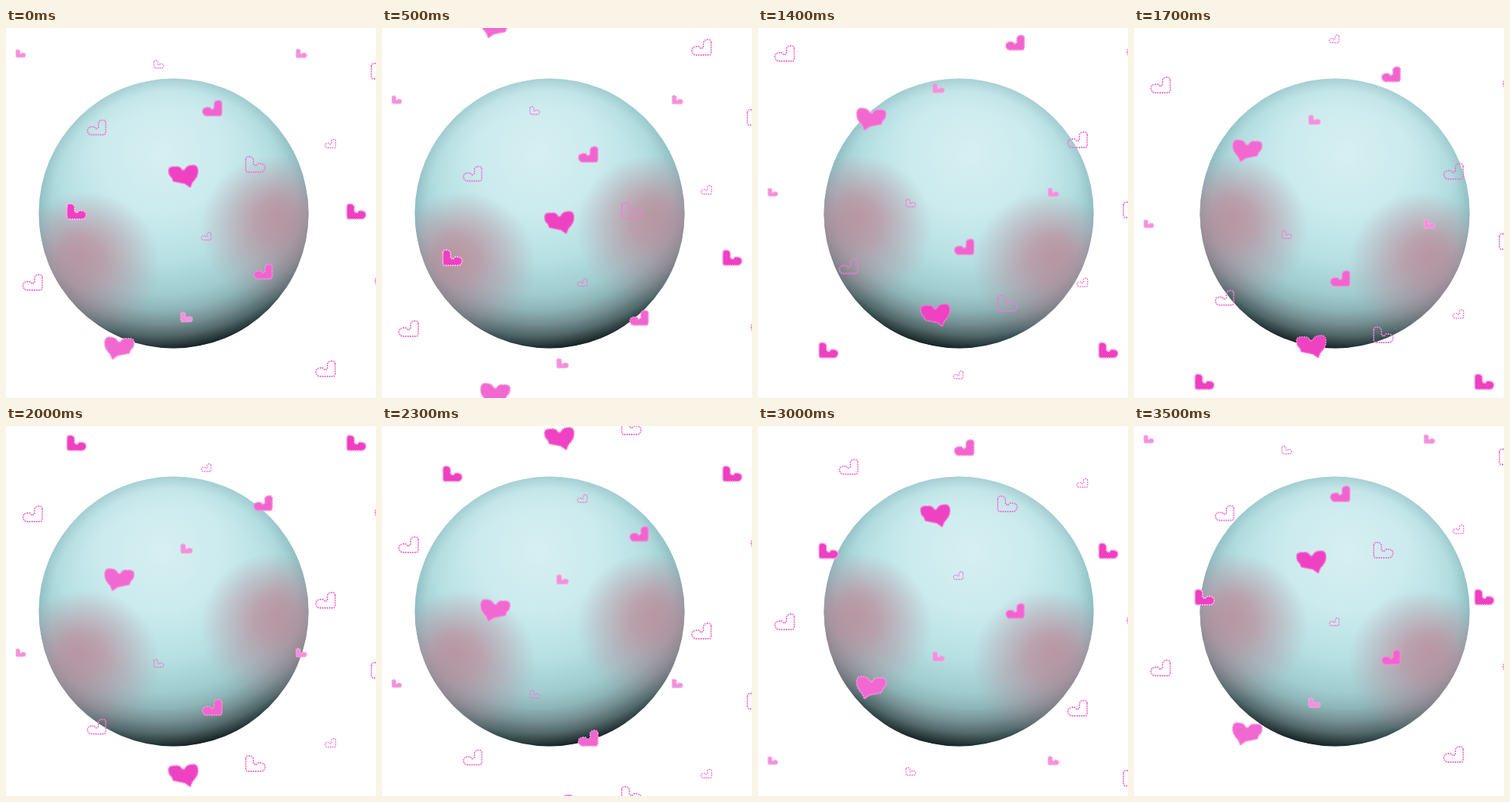
Recreate the animation shown at these times as an HTML page with a canvas. Size 480 px wide and 480 px high, loop 3.6 s.

```html
<!DOCTYPE html>
<html lang="en">
<head>
<meta charset="utf-8">
<title>Rocking ball and falling hearts</title>
<style>
html, body { margin: 0; width: 100%; height: 100%; overflow: hidden; background: #fff; }
canvas { display: block; width: 480px; height: 480px; }
</style>
</head>
<body>
<canvas id="stage" width="480" height="480"></canvas>
<script>
const ctx = document.getElementById("stage").getContext("2d");
const LOOP = 3600, STEP = 20.05, TILE = 477, RADIUS = 175;

// Heart outlines, drawn around their centres
const tilted = new Path2D("M-12-6Q-12-10-8-10Q-3-10-2-6V0L1 2L4-1H8Q13 0 13 4Q13 8 9 10H-10Q-12 9-12 6Z");
const large = new Path2D("M-1-7Q-4-13-10-12Q-20-13-19-6Q-19-1-15 2L-13 7L2 10L9 15L12 8Q19 1 19-6Q19-14 13-14Q4-14 2-8Z");

const styles = {
  line: { path: tilted, stroke: "#f07cd4" },
  hot: { path: tilted, fill: "#ee40c0", stroke: "#fab4ea" },
  pink: { path: tilted, fill: "#f164ce", stroke: "#f58fdd" },
  pale: { path: tilted, fill: "#f490da", stroke: "#f8a8e4" },
  bigHot: { path: large, fill: "#ee42c2", stroke: "#f27ad6" },
  bigPink: { path: large, fill: "#f169d0", stroke: "#f595de" }
};

// x, y, style, scale, direction (-1 mirrors)
const hearts = [
  [19, 33, "pale", .5, 1], [383, 33, "pale", .55, 1],
  [198, 47, "line", .5, 1], [486, 56, "line", 1, 1],
  [268, 104, "pink", 1, -1], [118, 129, "line", .95, -1],
  [421, 150, "line", .55, -1], [323, 177, "line", 1, 1],
  [230, 192, "bigHot", 1, 1], [91, 238, "hot", 1, 1],
  [454, 238, "hot", 1, 1], [260, 270, "line", .5, -1],
  [334, 316, "pink", .95, -1], [35, 330, "line", 1, -1],
  [492, 324, "line", 1, -1], [234, 375, "pale", .6, 1],
  [147, 415, "bigPink", 1, -1], [415, 442, "line", 1, -1]
];

function radial(focus, center, inner, outer, stops) {
  const g = ctx.createRadialGradient(...focus, inner, ...center, outer);
  for (const [at, color] of stops) g.addColorStop(at, color);
  return g;
}

function paintBall(fill) {
  ctx.fillStyle = fill;
  ctx.fillRect(-RADIUS, -RADIUS, 2 * RADIUS, 2 * RADIUS);
}

const skin = radial([0, -80], [0, -80], 0, 255, [
  [0, "#d6eff2"], [.31, "#cbebee"], [.55, "#b6e0e3"], [.72, "#a0cccf"],
  [.8, "#8db5b8"], [.87, "#758f92"], [.93, "#516466"], [.97, "#273031"], [1, "#000"]
]);
const rim = radial([0, 0], [0, 0], 135, RADIUS, [
  [0, "rgba(90,150,158,0)"], [.6, "rgba(90,150,158,.06)"], [1, "rgba(80,135,143,.25)"]
]);
const blushes = [-1, 1].map(side => radial([side * 130, 28], [side * 124, 45], 0, 96, [
  [0, "rgba(190,130,146,.75)"], [.3, "rgba(190,130,146,.64)"],
  [.65, "rgba(188,134,150,.34)"], [1, "rgba(185,140,155,0)"]
]));

function drawBall(leansLeft) {
  ctx.save();
  ctx.translate(leansLeft ? 217.5 : 260.5, 240.5);
  ctx.rotate((leansLeft ? -11 : 11) * Math.PI / 180);
  ctx.beginPath();
  ctx.arc(0, 0, RADIUS, 0, 2 * Math.PI);
  ctx.clip();
  [skin, rim, ...blushes].forEach(paintBall);
  ctx.restore();
}

function drawHeart(x, y, { path, fill, stroke }, scale, dir) {
  ctx.save();
  ctx.translate(x, y);
  ctx.scale(scale * dir, scale);
  if (fill) {
    ctx.fillStyle = fill;
    ctx.fill(path);
  }
  ctx.strokeStyle = stroke;
  ctx.lineWidth = 1.8 / Math.sqrt(scale);
  ctx.setLineDash([2 / scale, 1 / scale]);
  ctx.stroke(path);
  ctx.restore();
}

function draw(now) {
  const t = now % LOOP;
  // Steps alternate between 200 and 100 ms
  const step = 2 * Math.floor(t / 300) + (t % 300 >= 200 ? 1 : 0);
  const drop = Math.round(step * STEP);

  ctx.fillStyle = "#fff";
  ctx.fillRect(0, 0, 480, 480);
  drawBall(t % 1800 < 900);
  for (const [x, y, style, scale, dir] of hearts) {
    const top = (y + drop) % TILE;
    for (const copy of [top - TILE, top, top + TILE])
      if (copy > -20 && copy < 500) drawHeart(x, copy, styles[style], scale, dir);
  }
}

const start = performance.now();
function tick() {
  draw(performance.now() - start);
  requestAnimationFrame(tick);
}
tick();
</script>
</body>
</html>
```
